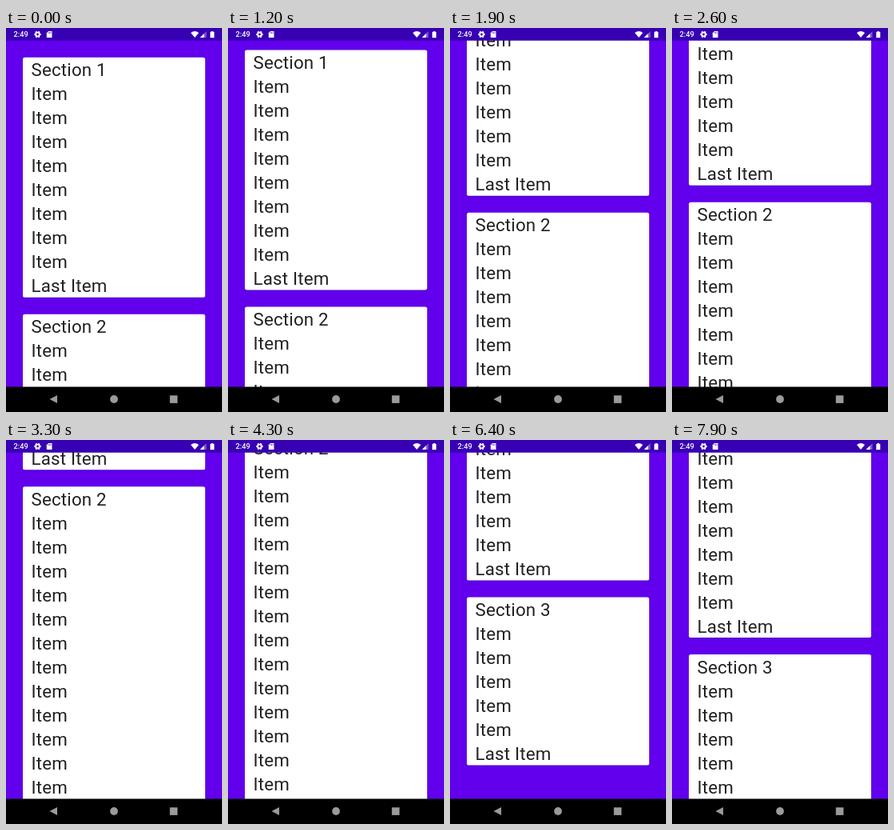
An HTML page with a canvas that plays this animation: 270x480 px, repeating every 8 s.

```html
<!DOCTYPE html>
<html lang="en">
<head>
<meta charset="utf-8">
<style>
  html, body { margin: 0; width: 100%; height: 100%; overflow: hidden; background: #000; }
  canvas { display: block; }
</style>
</head>
<body>
<canvas id="stage" width="270" height="480"></canvas>
<script>
const ctx = document.getElementById('stage').getContext('2d');
const LOOP = 8000, STEP = 100;
const ROW = 30, GAP = 21, STATUS = 15.75, NAV = 448.5;
const SECTIONS = [10, 20, 7]; // rows per card
const MAX_SCROLL = STATUS + GAP + 37 * ROW + 4 * GAP - NAV;

const FLINGS = [
  { start: 1100, end: 2600, to: 140 },
  { start: 2900, end: 3900, to: 354.2 },
  { start: 4250, end: 5300, to: 583.25 },
  { start: 5400, end: 6000, to: MAX_SCROLL },
  { start: 7600, end: 8400, to: 680.5 }
];

// quick pick-up, long friction tail
const flingEase = u => 1 - (1 - u ** 1.6) ** 5.2;

function scrollAt(t) {
  return FLINGS.reduce((pos, { start, end, to }) => {
    const u = Math.min(1, Math.max(0, (t - start) / (end - start)));
    return pos + (to - pos) * flingEase(u);
  }, 0);
}

function rect(color, x, y, w, h) {
  ctx.fillStyle = color;
  ctx.fillRect(x, y, w, h);
}

function polygon(color, ...points) {
  ctx.fillStyle = color;
  ctx.beginPath();
  points.forEach(([x, y]) => ctx.lineTo(x, y));
  ctx.fill();
}

function circle(color, x, y, r) {
  ctx.fillStyle = color;
  ctx.beginPath();
  ctx.arc(x, y, r, 0, Math.PI * 2);
  ctx.fill();
}

function text(label, x, y, font, color, spacing) {
  ctx.font = font;
  ctx.letterSpacing = spacing;
  ctx.fillStyle = color;
  ctx.fillText(label, x, y);
}

function drawCard(number, rows, y) {
  ctx.save();
  ctx.shadowColor = 'rgba(0,0,0,.3)';
  ctx.shadowBlur = 2;
  ctx.shadowOffsetY = 0.6;
  ctx.fillStyle = '#fff';
  ctx.beginPath();
  ctx.roundRect(GAP, y, 270 - 2 * GAP, rows * ROW, 2.6);
  ctx.fill();
  ctx.restore();
  for (let i = 0; i < rows; i++) {
    const label = i === 0 ? `Section ${number}` : i === rows - 1 ? 'Last Item' : 'Item';
    text(label, 31.5, y + i * ROW + 23.6, '22.3px Roboto, sans-serif', '#212121', '0.2px');
  }
}

function drawStatusBar() {
  const white = '#fff', bar = '#3700b3';
  rect(bar, 0, 0, 270, STATUS);
  text('2:49', 9.5, 11.3, '500 9.2px Roboto, sans-serif', white, '0px');
  // gear
  for (let i = 0; i < 6; i++) {
    const a = i * Math.PI / 3;
    circle(white, 39.5 + 3.1 * Math.cos(a), 8 + 3.1 * Math.sin(a), 1.2);
  }
  circle(white, 39.5, 8, 3.2);
  circle(bar, 39.5, 8, 1.4);
  // memory card
  polygon(white, [53, 4], [57.5, 4], [57.5, 12], [50.8, 12], [50.8, 6.3]);
  for (let i = 0; i < 3; i++) rect(bar, 52.7 + i * 1.5, 5.2, 0.7, 1.7);
  // wifi
  ctx.fillStyle = white;
  ctx.beginPath();
  ctx.moveTo(236, 12);
  ctx.lineTo(231, 6);
  ctx.quadraticCurveTo(236, 2.2, 241, 6);
  ctx.fill();
  // signal, partly filled
  polygon('rgba(255,255,255,.35)', [250.5, 4], [250.5, 12], [242.5, 12]);
  polygon(white, [247.5, 7], [247.5, 12], [242.5, 12]);
  // battery
  rect(white, 255.3, 4.8, 5, 7.4);
  rect(white, 256.8, 4, 2, 1);
}

function drawNavBar() {
  const gray = '#9a9a9a';
  rect('#000', 0, NAV, 270, 480 - NAV);
  polygon(gray, [54.5, 464], [64, 459], [64, 469]);
  circle(gray, 135, 464, 4.9);
  rect(gray, 204.8, 459.3, 9.6, 9.6);
}

function draw(now) {
  const t = Math.floor(now % LOOP / STEP) * STEP;
  rect('#6200ee', 0, 0, 270, 480);
  let y = STATUS + GAP - scrollAt(t);
  SECTIONS.forEach((rows, i) => {
    drawCard(i + 1, rows, y);
    y += rows * ROW + GAP;
  });
  drawStatusBar();
  drawNavBar();
}

let start;
function tick(now) {
  start ??= now;
  draw(now - start);
  requestAnimationFrame(tick);
}
draw(0);
requestAnimationFrame(tick);
</script>
</body>
</html>
```
